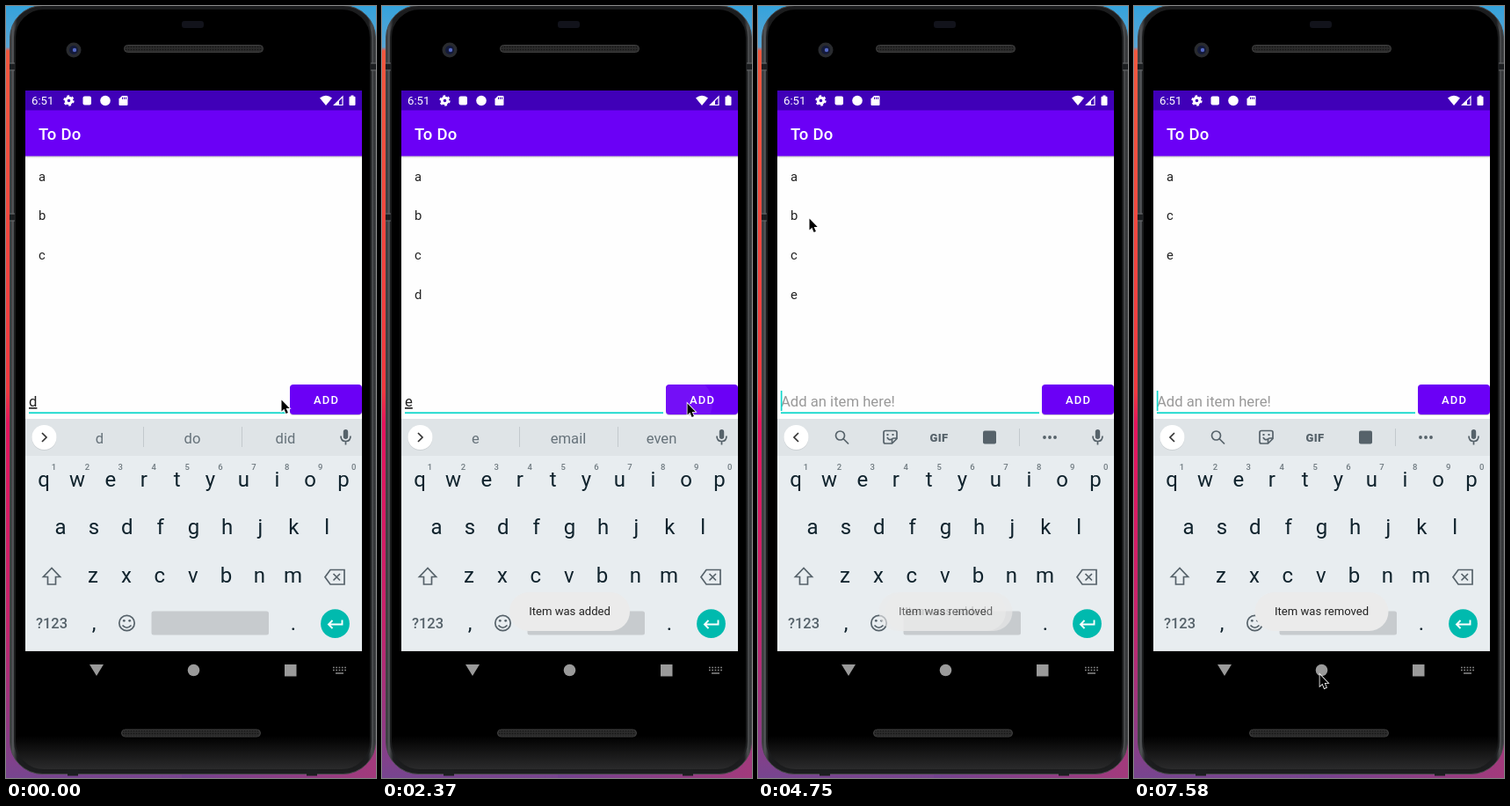
An HTML page that plays this animation: 421 by 877 pixels, repeating every 8 s.

```html
<!DOCTYPE html>
<html lang="en">
<head>
<meta charset="utf-8">
<title>To Do</title>
<style>
  html, body { margin: 0; width: 100%; height: 100%; overflow: hidden; background: #000; }
  svg { display: block; width: 100%; height: 100%; font-family: Roboto, sans-serif; }
  .mid { text-anchor: middle; }
  .key { font-size: 24px; fill: #10232d; }
  .hintNum { font-size: 9.5px; font-weight: 500; fill: #6f7a80; }
  .word { font-size: 16.6px; fill: #66727a; }
  .item { font-size: 14.8px; fill: #222; }
  .field { font-size: 16.65px; }
  .toast text { font-size: 13.1px; fill: #222; }
  .line { fill: none; stroke: #56626a; stroke-width: 1.7; }
  .grey { fill: #56626a; }
</style>
</head>
<body>
<svg viewBox="0 0 421 877">
  <defs>
    <linearGradient id="wall" x2="0" y2="1">
      <stop offset="0" stop-color="#35a3dc"/><stop offset=".053" stop-color="#5aa5d4"/>
      <stop offset=".058" stop-color="#f0583f"/><stop offset=".5" stop-color="#f0383f"/>
      <stop offset=".54" stop-color="#e5145c"/><stop offset=".8" stop-color="#c5246c"/>
      <stop offset="1" stop-color="#77458f"/>
    </linearGradient>
    <linearGradient id="floor">
      <stop offset="0" stop-color="#73428f"/><stop offset="1" stop-color="#a23a7c"/>
    </linearGradient>
    <linearGradient id="edge" x2="1" y2="0">
      <stop offset="0" stop-color="#2a2c2e"/><stop offset=".008" stop-color="#55575a"/>
      <stop offset=".02" stop-color="#1c1d1f"/><stop offset=".98" stop-color="#1c1d1f"/>
      <stop offset=".99" stop-color="#4c4e50"/><stop offset="1" stop-color="#2a2c2e"/>
    </linearGradient>
    <linearGradient id="body" x2="0" y2="1">
      <stop offset="0" stop-color="#000"/><stop offset=".955" stop-color="#000"/>
      <stop offset="1" stop-color="#2c2c2d"/>
    </linearGradient>
    <linearGradient id="shade" x2="0" y2="1">
      <stop offset="0" stop-color="#bbb"/><stop offset="1" stop-color="#fff"/>
    </linearGradient>
    <pattern id="mesh" width="3" height="3" patternUnits="userSpaceOnUse">
      <rect width="3" height="3" fill="#2b2b2b"/><circle cx="1.5" cy="1.5" r=".8" fill="#141414"/>
    </pattern>
    <clipPath id="buttonClip"><rect x="323" y="430" width="82" height="34" rx="4"/></clipPath>
  </defs>

  <!-- Phone -->
  <rect width="421" height="877" fill="url(#wall)"/>
  <rect x="200" y="840" width="221" height="37" fill="url(#floor)"/>
  <rect x="4.500" y="-.5" width="416" height="873" rx="37" fill="url(#edge)" stroke="#48494b"/>
  <rect x="10" y="3" width="405" height="865" rx="33" fill="url(#body)" stroke="#1b1c1d" stroke-width="2"/>
  <path d="M4 69h6M4 240h6M415 69h6M70 871h12M342 871h12" stroke="#1c1e20" stroke-width="7"/>
  <path d="M4 65h6M4 73h6M4 236h6M4 244h6M415 65h6M415 73h6" stroke="#66686a"/>
  <rect x="200" y="17" width="25" height="8" rx="3" fill="#12131b"/>
  <circle cx="77" cy="50" r="8.500" fill="#292b2f"/>
  <circle cx="77" cy="50" r="5" fill="#141a38"/>
  <circle cx="78" cy="50" r="2.200" fill="#5468c4"/>
  <g fill="url(#mesh)" stroke="#404040">
    <rect x="134.500" y="44.500" width="158" height="8" rx="4"/>
    <rect x="131.500" y="822" width="158" height="8" rx="4"/>
  </g>

  <!-- Status and title bars -->
  <rect x="22" y="96" width="383" height="636.700" fill="#fefefe"/>
  <rect x="22" y="170" width="383" height="3" fill="url(#shade)"/>
  <rect x="22" y="118" width="383" height="52.500" fill="#6b00f6"/>
  <rect x="22" y="96" width="383" height="22.500" fill="#4000b8"/>
  <g fill="#fff">
    <text x="29" y="112" font-size="13.200">6:51</text>
    <circle cx="71.500" cy="107.500" r="3.300" fill="none" stroke="#fff" stroke-width="3"/>
    <circle cx="71.500" cy="107.500" r="5.200" fill="none" stroke="#fff" stroke-width="2" stroke-dasharray="2.7 2.745"/>
    <rect x="87.500" y="102.500" width="9.500" height="10" rx="2"/>
    <circle cx="113" cy="107.500" r="5.800"/>
    <path d="M132 102h5.500q1 0 1 1v9q0 1-1 1h-8q-1 0-1-1v-6.500z"/>
    <path d="M132.500 103.500v2.500M134.500 103.500v2.500M136.500 103.500v2.500" stroke="#4000b8"/>
    <path d="M357 104.500q7-5.500 14 0l-7 8.500z"/>
    <path d="M383 103v9.500h-9.500z" fill="none" stroke="#fff" stroke-width="1.200"/>
    <path d="M379 107.500v5h-5.500z"/>
    <path d="M392.500 101.500h3v1.300h1q1 0 1 1v8.200q0 1-1 1h-5q-1 0-1-1v-8.200q0-1 1-1h1z"/>
    <text x="37" y="152" font-size="18.500" font-weight="500" letter-spacing=".3">To Do</text>
  </g>

  <g id="items"></g>

  <!-- Entry row -->
  <text id="entry" class="field" x="26" y="455"></text>
  <rect x="26" y="461.300" width="294" height="1.800" fill="#12d8cc"/>
  <rect id="caret" y="437" width="1.700" height="23" fill="#12d8cc"/>
  <rect x="323" y="431" width="82" height="34" rx="4" fill="#c9c2d4"/>
  <rect x="323" y="430" width="82" height="34" rx="4" fill="#6b00f6"/>
  <g clip-path="url(#buttonClip)"><circle id="ripple" cx="347" cy="451" fill="#fff"/></g>
  <text x="350" y="452" font-size="13" font-weight="500" letter-spacing="1.160" fill="#fff">ADD</text>

  <!-- Keyboard -->
  <rect x="22" y="469" width="383" height="263.700" fill="#e8edf0"/>
  <rect x="22" y="469" width="383" height="42" fill="#dfe4e7"/>
  <circle cx="43.500" cy="491" r="14" fill="#cdd2d5"/>
  <circle cx="43.500" cy="490" r="14" fill="#fff"/>
  <path id="chevron" class="line" style="stroke:#333"/>
  <g id="words">
    <path d="M156.500 478v23M268.500 478v23" stroke="#c3c9cd"/>
    <text class="word mid" x="106.500" y="497"></text>
    <text class="word mid" x="212" y="497"></text>
    <text class="word mid" x="318" y="497"></text>
  </g>
  <g id="tools">
    <circle class="line" cx="93.500" cy="488" r="5"/>
    <path class="line" d="M97 491.500l6 6"/>
    <path class="line" d="M145 482.500h11q2 0 2 2v7l-5.500 5.500h-7.500q-2 0-2-2v-10.500q0-2 2-2zM158 491h-3.500q-2 0-2 2v4M147 490q2 4 5 2"/>
    <path class="grey" d="M146.500 486h2v2h-2zM152.500 486h2v2h-2z"/>
    <text class="grey mid" x="206" y="494.500" font-size="13" font-weight="800" letter-spacing=".4">GIF</text>
    <rect class="grey" x="256" y="482.500" width="15" height="15" rx="2"/>
    <path d="M297.500 480v20" stroke="#c3c9cd"/>
    <path d="M326 490h.01M332 490h.01M338 490h.01" stroke="#56626a" stroke-width="3.800" stroke-linecap="round"/>
  </g>
  <rect class="grey" x="383.800" y="481" width="5.400" height="11" rx="2.700"/>
  <path class="line" d="M381 488.500q0 6 5.500 6t5.500-6M386.500 494.500v4"/>
  <g id="keys"></g>
  <path class="line" d="M52 638.500l-9.500 10h5v8.500h9v-8.500h5z"/>
  <path class="line" d="M369 640.500h16v16.500h-16l-6-8.250zM372.500 645l7.500 7.500M380 645l-7.500 7.500"/>
  <text class="grey mid" x="52" y="707" font-size="16.500" font-weight="500">?123</text>
  <circle class="line" cx="137.500" cy="701" r="8.700"/>
  <path class="line" d="M132.500 703.500q5 5.500 10 0"/>
  <circle class="grey" cx="134.300" cy="698.300" r="1.400"/>
  <circle class="grey" cx="140.700" cy="698.300" r="1.400"/>
  <rect x="165.500" y="687.500" width="133.500" height="27" rx="2.500" fill="#c7cbce"/>
  <circle cx="374.500" cy="701.700" r="16.400" fill="#00baae"/>
  <path d="M382.500 697.500v5h-15M371.500 698l-4.500 4.500 4.500 4.500" fill="none" stroke="#fff" stroke-width="1.900"/>

  <!-- Navigation bar -->
  <g fill="#9a9a9a">
    <path d="M95 748h16l-8 13z"/>
    <circle cx="213.500" cy="754.500" r="6.800"/>
    <rect x="317" y="748" width="13.500" height="13.500"/>
  </g>
  <path d="M372 751.500h15M372 754.500h15" stroke="#8a8a8a" stroke-width="1.700" stroke-dasharray="1.700 1.600"/>
  <path d="M375 758h9" stroke="#8a8a8a" stroke-width="1.500"/>

  <g id="toasts"></g>
  <path id="pointer" d="M.5.500v13l2.900-2.700 2.200 5.300 2.300-1-2.200-5.200h4z" stroke="#fff" stroke-width="1.600" paint-order="stroke"/>
</svg>
<script>
const $ = id => document.getElementById(id);
const LOOP = 8000, STEP = 148.6;

// The latest entry whose start time has passed
const current = (list, t) => list.filter(([start]) => start <= t).pop()[1];
const ramp = (t, from, to) => Math.min(1, Math.max(0, (t - from) / (to - from)));
const smooth = u => u * u * (3 - 2 * u);

const lists = [[0, 'abc'], [440, 'abcd'], [2600, 'abcde'], [4400, 'abce'], [5600, 'ace']];
const entries = [[0, 'd'], [440, ''], [1630, 'e'], [2600, '']];
const suggestions = { d: ['d', 'do', 'did'], e: ['e', 'email', 'even'] };
const caretOn = [[440, 940], [1630, 2130], [2600, 3150], [3715, 4230], [4720, 5300],
  [5400, 5850], [6380, 6850], [7350, 8000]];
const presses = [290, 2300];
const path = [[0, 313, 447], [300, 348, 451], [590, 348, 451], [1180, 113, 538],
  [1630, 113, 538], [2230, 347, 451], [2670, 347, 451], [3400, 62, 324], [4400, 62, 324],
  [4700, 58, 241], [5780, 58, 241], [6090, 134, 413], [6240, 212, 645], [6600, 212, 645],
  [6950, 217, 700], [7350, 211, 759], [LOOP, 211, 759]];
// Label, half width, fade in start/end, fade out start/end
const toasts = [
  ['Item was added', 68.5, 560, 900, 2780, 3240],
  ['Item was added', 68.5, 2780, 3240, 4600, 5000],
  ['Item was removed', 76, 4500, 4900, LOOP, LOOP + 1]
];

const rows = [['qwertyuiop', 43, 546], ['asdfghjkl', 62, 600], ['zxcvbnm', 99, 655], [',', 100, 709], ['.', 327, 709]];
$('keys').innerHTML = rows.map(([letters, x, y], row) => [...letters].map((letter, i) => {
  const cx = x + i * 37.9;
  const number = row ? '' : `<text class="hintNum mid" x="${cx + 11.5}" y="527">${(i + 1) % 10}</text>`;
  return `<text class="key mid" x="${cx}" y="${y}">${letter}</text>${number}`;
}).join('')).join('');

$('toasts').innerHTML = toasts.map(([label, half]) => `<g class="toast">
  <rect x="${213.5 - half}" y="666" width="${half * 2}" height="44" rx="22" fill="#ebebeb"/>
  <text class="mid" x="213.500" y="692">${label}</text></g>`).join('');

function pointerAt(t) {
  const i = path.findIndex(([time]) => time > t);
  const [t0, x0, y0] = path[i - 1], [t1, x1, y1] = path[i];
  const u = smooth(ramp(t, t0, t1));
  return [x0 + (x1 - x0) * u, y0 + (y1 - y0) * u];
}

function draw(t) {
  $('items').innerHTML = [...current(lists, t)].map((letter, i) =>
    `<text class="item" x="37" y="${198.7 + i * 44.6}">${letter}</text>`).join('');

  const text = current(entries, t);
  const entry = $('entry');
  entry.textContent = text || 'Add an item here!';
  entry.setAttribute('fill', text ? '#222' : '#999');
  entry.setAttribute('text-decoration', text ? 'underline' : 'none');
  $('caret').setAttribute('x', text ? 35 : 25.8);
  $('caret').setAttribute('opacity', caretOn.some(([a, b]) => t >= a && t < b) ? 1 : 0);

  $('words').setAttribute('visibility', text ? 'visible' : 'hidden');
  $('tools').setAttribute('visibility', text ? 'hidden' : 'visible');
  $('words').querySelectorAll('text').forEach((word, i) => {
    word.textContent = text ? suggestions[text][i] : '';
  });
  $('chevron').setAttribute('d', text ? 'M41 485l5 5-5 5' : 'M46 485l-5 5 5 5');

  const age = t - presses.filter(p => p <= t).pop();
  $('ripple').setAttribute('r', age >= 0 ? 12 + age * 0.22 : 0);
  $('ripple').setAttribute('opacity', age >= 0 ? 0.06 * (1 - ramp(age, 250, 550)) : 0);

  document.querySelectorAll('.toast').forEach((toast, i) => {
    const [, , inA, inB, outA, outB] = toasts[i];
    toast.setAttribute('opacity', ramp(t, inA, inB) * (1 - ramp(t, outA, outB)));
  });
  $('pointer').setAttribute('transform', `translate(${pointerAt(t)})`);
}

const began = performance.now();
function tick() {
  const t = (performance.now() - began) % LOOP;
  // The screen refreshes in coarse steps and rests at the end
  draw(Math.min(51, Math.floor((t + 10) / STEP)) * STEP);
  requestAnimationFrame(tick);
}
tick();
</script>
</body>
</html>
```
